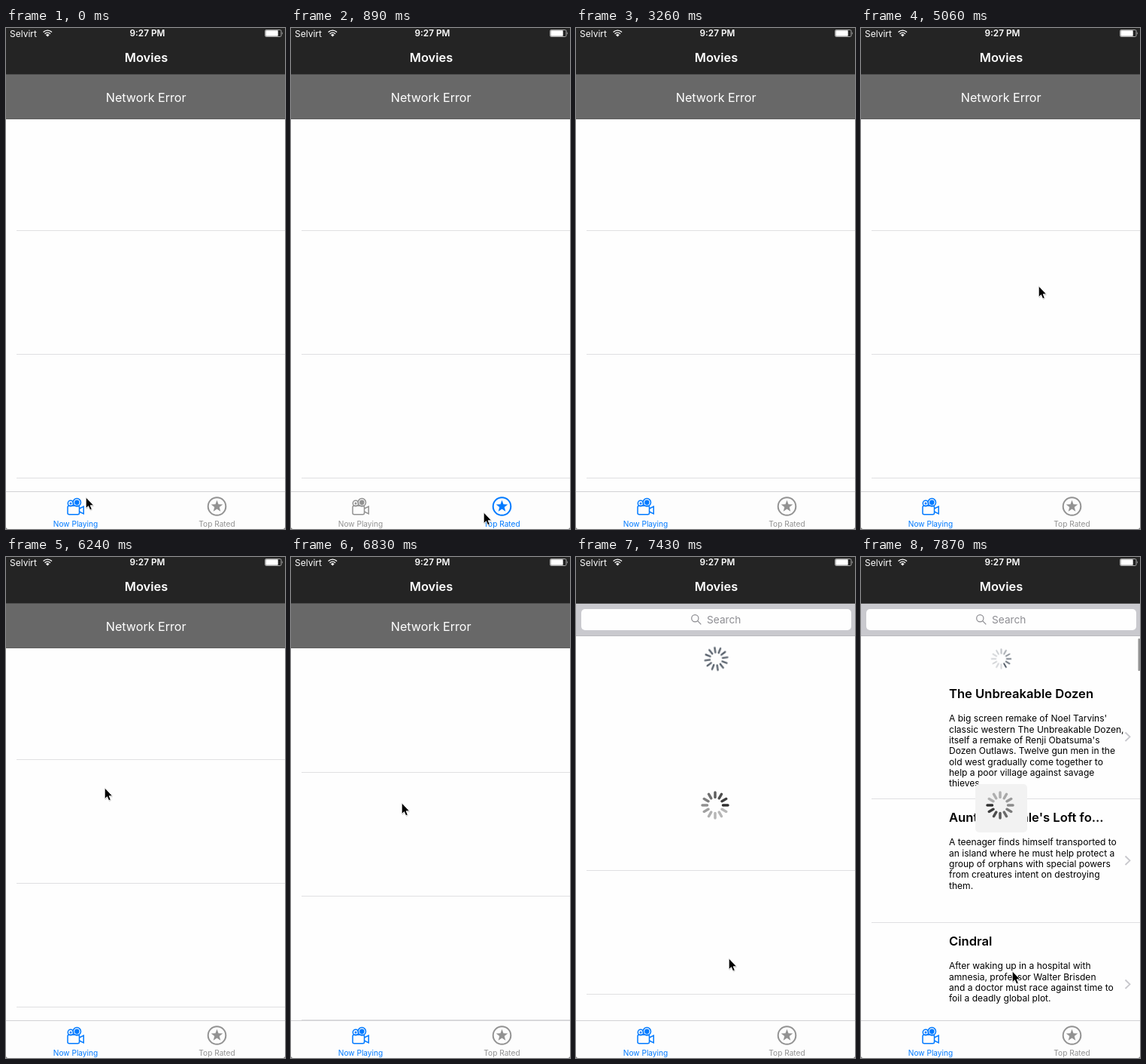
Recreate the animation shown at these times as an HTML page. Size 371 by 664 pixels, loop 8 s.

```html
<!DOCTYPE html>
<html lang="en">
<head>
<meta charset="utf-8">
<title>Movie list refresh</title>
<style>
  html, body { margin: 0; width: 100%; height: 100%; overflow: hidden; background: #fefefe; }
  svg { display: block; width: 100vw; height: 100vh; font-family: Inter, Roboto, sans-serif; }
  .mid { text-anchor: middle; }
  .line { fill: none; stroke: currentColor; }

  /* every track is an 8 s loop of held poses */
  .cursor, .list, .now, .top, .banner, .late, .rows, .pull, .sweep, .spin, .turn, .wheel {
    animation: 8s step-end infinite;
  }
  .cursor { animation-name: cursor; }
  .list { animation-name: list; }
  .now { animation-name: now; }
  .top { animation-name: top; }
  .banner { animation-name: early; }
  .late { animation-name: late; }
  .rows { animation-name: rows; }
  .pull { animation-name: pull; }
  .sweep { animation-name: sweep; }
  .spin { animation-name: spin; }
  .turn { animation-name: turn; }
  .wheel { animation-name: wheel; }

  @keyframes cursor {
    0% { transform: translate(106px, 622px); }
    1.875% { transform: translate(114px, 624px); }
    3.75% { transform: translate(142px, 630px); }
    5.5% { transform: translate(186px, 637px); }
    7.375% { transform: translate(232px, 641px); }
    9.25% { transform: translate(254px, 642px); }
    11.125% { transform: translate(256px, 642px); }
    12.875% { transform: translate(255px, 642px); }
    14.75% { transform: translate(252px, 642px); }
    16.625% { transform: translate(225px, 643px); }
    18.5% { transform: translate(173px, 643px); }
    20.375% { transform: translate(120px, 640px); }
    22.125% { transform: translate(104px, 640px); }
    24% { transform: translate(98px, 640px); opacity: 1; }
    38.875% { transform: translate(206px, 551px); opacity: 1; }
    40.75% { transform: translate(206px, 551px); opacity: 0; }
    63.25% { transform: translate(236px, 342px); opacity: 1; }
    65.125% { transform: translate(172px, 290px); }
    66.875% { transform: translate(104px, 240px); }
    68.75% { transform: translate(79px, 262px); }
    70.625% { transform: translate(112px, 296px); }
    72.5% { transform: translate(130px, 306px); }
    78% { transform: translate(131px, 306px); }
    79.875% { transform: translate(133px, 308px); }
    81.75% { transform: translate(138px, 314px); }
    83.625% { transform: translate(147px, 326px); }
    85.5% { transform: translate(158px, 343px); }
    87.25% { transform: translate(171px, 366px); }
    89.125% { transform: translate(189px, 408px); }
    91% { transform: translate(204px, 460px); }
    92.875% { transform: translate(203px, 532px); }
    94.75% { transform: translate(202px, 546px); }
    96.625%, 100% { transform: translate(201px, 549px); }
  }
  @keyframes list {
    0% { transform: translateY(0); }
    79.875% { transform: translateY(2px); }
    81.75% { transform: translateY(7px); }
    83.625% { transform: translateY(17px); }
    85.5% { transform: translateY(30px); }
    87.25% { transform: translateY(47px); }
    89.125% { transform: translateY(76px); }
    91% { transform: translateY(108px); }
    92.875% { transform: translateY(147px); }
    94.75% { transform: translateY(118px); }
    96.625% { transform: translateY(60px); }
    98.375%, 100% { transform: translateY(52px); }
  }
  @keyframes now {
    0%, 31.375% { color: #007aff; }
    11.125% { color: #929292; }
    100% { color: #007aff; }
  }
  @keyframes top {
    0%, 31.375% { color: #929292; }
    11.125% { color: #007aff; }
    100% { color: #929292; }
  }
  @keyframes early { 0% { opacity: 1; } 92.875%, 100% { opacity: 0; } }
  @keyframes late { 0% { opacity: 0; } 92.875%, 100% { opacity: 1; } }
  @keyframes rows { 0% { opacity: 0; } 98.375%, 100% { opacity: 1; } }
  @keyframes pull {
    0% { transform: none; opacity: 1; }
    92.875% { transform: rotate(-8deg) scale(1.18); opacity: 1; }
    94.75%, 100% { opacity: 0; }
  }
  @keyframes sweep {
    0% { stroke-dashoffset: 12; }
    85.5% { stroke-dashoffset: 11; }
    87.25% { stroke-dashoffset: 8; }
    89.125% { stroke-dashoffset: 5; }
    91% { stroke-dashoffset: 1; }
    92.875%, 100% { stroke-dashoffset: 0; }
  }
  @keyframes spin { 0% { opacity: 0; } 94.75%, 100% { opacity: 1; } }
  @keyframes turn {
    0% { transform: rotate(30deg); }
    96.625% { transform: rotate(90deg); }
    98.375%, 100% { transform: rotate(150deg); }
  }
  @keyframes wheel {
    0% { transform: rotate(90deg); }
    94.75% { transform: rotate(150deg); }
    96.625% { transform: rotate(210deg); }
    98.375%, 100% { transform: rotate(270deg); }
  }
</style>
</head>
<body>
<svg viewBox="0 0 371 664" preserveAspectRatio="none">
  <defs>
    <mask id="reveal" maskUnits="userSpaceOnUse" x="-20" y="-20" width="40" height="40">
      <circle class="sweep" r="10" fill="none" stroke="#fff" stroke-width="20"
        pathLength="12" stroke-dasharray="12 12" transform="rotate(-105)"/>
    </mask>
  </defs>
  <rect width="371" height="664" fill="#fefefe"/>

  <g transform="translate(186.5 135)">
    <g class="pull"><g id="pullSpokes" mask="url(#reveal)"/></g>
    <g class="spin"><g class="turn" id="spinSpokes"/></g>
  </g>

  <g class="list">
    <g fill="#e0e0e2">
      <rect x="14" y="268" width="357" height="1"/>
      <rect x="14" y="432" width="357" height="1"/>
      <rect x="14" y="596" width="357" height="1"/>
    </g>
    <g class="rows" id="rows"/>
  </g>
  <rect class="rows" x="368.5" y="108" width="2.5" height="43" rx="1" fill="#949494"/>

  <rect class="rows" x="152" y="301" width="69" height="64" rx="5" fill="#f2f2f2"/>
  <g class="late" transform="translate(185 329)"><g class="wheel" id="hudSpokes"/></g>

  <g class="late">
    <rect y="61" width="371" height="44" fill="#c9c9ce"/>
    <rect y="104" width="371" height="1" fill="#b9b9be"/>
    <rect x="7" y="69" width="359" height="28" rx="5" fill="#fefefe"/>
    <g fill="none" stroke="#8a8a8f" stroke-width="1.2">
      <circle cx="158.3" cy="81.3" r="4.6"/>
      <path d="M161.7 84.7L166.3 89.3"/>
    </g>
    <text x="174" y="88" font-size="13.7" fill="#8e8e93">Search</text>
  </g>
  <g class="banner">
    <rect y="61" width="371" height="60" fill="#686868"/>
    <rect y="120" width="371" height="1" fill="#5e5e5e"/>
    <text class="mid" x="186.2" y="97.5" font-size="16.1" fill="#fff">Network Error</text>
  </g>

  <rect width="371" height="61" fill="#242424"/>
  <rect y="61" width="371" height="1" fill="#4c4c4c"/>
  <g fill="#fff">
    <text x="5" y="11.5" font-size="12">Selvirt</text>
    <text class="mid" x="188" y="11.3" font-size="11.8" font-weight="600">9:27 PM</text>
    <text class="mid" x="186.5" y="45" font-size="16.4" font-weight="600">Movies</text>
    <path d="M55.3 11.6L53 9.2A3.3 3.3 0 0 1 57.6 9.2Z"/>
    <g fill="none" stroke="#fff" stroke-width="1.4">
      <path d="M51.6 7.7A5.2 5.2 0 0 1 59 7.7M49.6 5.5A8 8 0 0 1 61 5.5"/>
    </g>
    <rect x="344.5" y="2.5" width="21.5" height="9" rx="1.6" fill="none" stroke="#a8a8a8" stroke-width="1"/>
    <rect x="345.3" y="3.3" width="16.4" height="7.4" rx=".6"/>
    <path d="M367 5.2Q368.8 7 367 8.8Z" fill="#b5b5b5"/>
  </g>

  <rect y="614" width="371" height="50" fill="#fdfdfd"/>
  <rect y="614" width="371" height="1" fill="#d2d2d4"/>
  <g class="now">
    <g class="line" stroke-width="1.5">
      <rect x="82" y="633.2" width="15.5" height="11.6" rx="2"/>
      <path d="M97.5 637L103.2 634.2V643.8L97.5 641"/>
      <circle cx="86" cy="630" r="3.7"/>
      <circle cx="94.3" cy="628.8" r="5.2"/>
    </g>
    <circle cx="86" cy="630" r="1.5" fill="currentColor"/>
    <circle cx="94.3" cy="628.8" r="3.2" fill="currentColor"/>
    <text class="mid" x="92.5" y="660.5" font-size="10.15" fill="currentColor">Now Playing</text>
  </g>
  <g class="top">
    <circle class="line" cx="280.5" cy="634" r="11.8" stroke-width="2"/>
    <path id="star" fill="currentColor"/>
    <text class="mid" x="280.5" y="660.5" font-size="10.15" fill="currentColor">Top Rated</text>
  </g>
  <path d="M0 661Q0 664 3 664H0ZM371 661Q371 664 368 664H371Z" fill="#6a6a6a"/>

  <g class="cursor">
    <path d="M.8 1.6V16L4 13L6.2 18L8.8 16.9L6.7 12.2H11.2Z" fill="#000" opacity=".2"/>
    <path d="M.2 -.2V14.7L3.5 11.7L5.7 16.8L8.3 15.7L6.2 10.8H10.7Z" fill="#000" stroke="#fff" stroke-width=".9"/>
  </g>
</svg>
<script>
  const byId = id => document.getElementById(id);

  function add(parent, tag, attrs, text = '') {
    const el = document.createElementNS('http://www.w3.org/2000/svg', tag);
    for (const key in attrs) el.setAttribute(key, attrs[key]);
    el.textContent = text;
    parent.append(el);
  }

  // Twelve spokes; the head is at 12 o'clock and the tail fades anticlockwise.
  function spokes(id, inner, outer, width, color, fade) {
    for (let i = 0; i < 12; i++) {
      add(byId(id), 'path', {
        d: `M0 ${-inner}V${-outer}`,
        stroke: color,
        'stroke-width': width,
        'stroke-linecap': 'round',
        opacity: fade(i ? 12 - i : 0),
        transform: `rotate(${i * 30})`
      });
    }
  }
  spokes('pullSpokes', 7.3, 12.7, 2, '#58616c', () => 1);
  spokes('spinSpokes', 7.3, 12.7, 2, '#58616c', n => Math.max(.25, 1 - n * .12));
  spokes('hudSpokes', 10.5, 17, 3.4, '#222', n => Math.max(.32, .95 - n * .075));

  let star = '';
  for (let i = 0; i < 10; i++) {
    const r = i % 2 ? 3.4 : 8.2, a = i * Math.PI / 5;
    star += `${i ? 'L' : 'M'}${280.5 + r * Math.sin(a)} ${634 - r * Math.cos(a)}`;
  }
  byId('star').setAttribute('d', star + 'Z');

  const movies = [
    ['The Unbreakable Dozen',
      "A big screen remake of Noel Tarvins'",
      'classic western The Unbreakable Dozen,',
      "itself a remake of Renji Obatsuma's",
      'Dozen Outlaws. Twelve gun men in the',
      'old west gradually come together to',
      'help a poor village against savage',
      'thieves.'],
    ["Aunt Ostervale's Loft fo...",
      'A teenager finds himself transported to',
      'an island where he must help protect a',
      'group of orphans with special powers',
      'from creatures intent on destroying',
      'them.'],
    ['Cindral',
      'After waking up in a hospital with',
      'amnesia, professor Walter Brisden',
      'and a doctor must race against time to',
      'foil a deadly global plot.']
  ];
  movies.forEach(([title, ...lines], row) => {
    const y = 104 + row * 164, list = byId('rows');
    add(list, 'text', { x: 117, y: y + 31.3, 'font-size': 16.6, 'font-weight': 600 }, title);
    lines.forEach((line, i) =>
      add(list, 'text', { x: 117, y: y + 62.4 + i * 14.3, 'font-size': 12.05 }, line));
    add(list, 'path', {
      d: `M351.5 ${y + 76.5}L357.5 ${y + 82.3}L351.5 ${y + 88}`,
      fill: 'none', stroke: '#c7c7cc', 'stroke-width': 1.8
    });
  });
</script>
</body>
</html>
```
